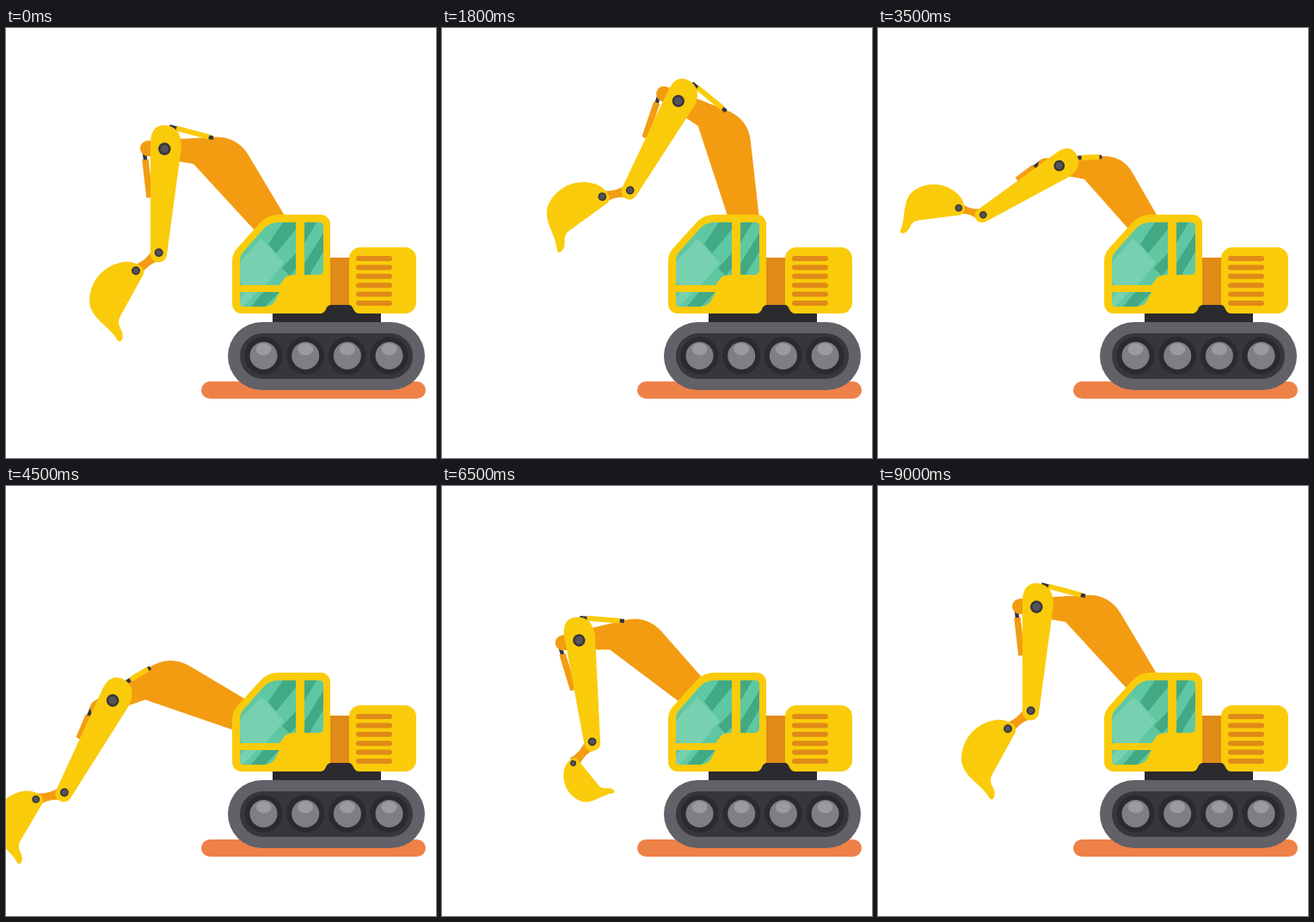
Animation, 500 px wide and 500 px high, one loop 10000 ms. Source, as an HTML page:

```html
<!DOCTYPE html>
<html lang="en">
<head>
<meta charset="utf-8">
<title>Excavator</title>
<style>
  html, body { margin: 0; height: 100%; overflow: hidden; background: #fff; }
  svg { display: block; width: 100%; height: 100%; }
  .yellow { fill: #facb0a; }
  .orange { fill: #f39c12; }
  .rust { fill: #e08a18; }
  .black { fill: #2b2a2f; }
  .glass { fill: #5fc8a2; }
  .shade { fill: #42a985; }
  .shine { fill: #77d0b0; }
  .rod { stroke: #37353b; stroke-width: 4.5; }
</style>
</head>
<body>
<svg viewBox="0 0 500 500">
  <defs>
    <g id="bolt">
      <circle r="7.3" fill="#37353b"/>
      <circle r="4.8" fill="#55535a"/>
    </g>
    <g id="wheel">
      <circle r="22" class="black"/>
      <circle r="16" fill="#7f7e84"/>
      <ellipse cy="-7.5" rx="9" ry="7" fill="#9b9aa0"/>
    </g>
    <clipPath id="panes">
      <path d="M272 299V271Q272 264 277 259L300 233Q307 226 316 226H337V287Q327 287 324 291L318 299Z"/>
      <path d="M272 307H318L313 317Q309 324 299 324H277Q272 324 272 319Z"/>
      <path d="M347 226H364Q369 226 369 231V281Q369 287 363 287H347Z"/>
    </clipPath>
  </defs>

  <rect x="227" y="411" width="261" height="20" rx="10" fill="#ee8148"/>

  <path id="rod1" class="rod"/>
  <path id="sleeve1" stroke="#f39c12" stroke-width="7.5"/>
  <g id="boom">
    <path class="orange" d="M165 131L240 127Q268 125 282 148L328 225L332 245L310 258L218 158L165 149A9 9 0 0 1 165 131Z"/>
  </g>
  <path id="rod2" class="rod"/>
  <path id="sleeve2" stroke="#facb0a" stroke-width="6"/>
  <g id="stick">
    <path class="orange" d="M148 276Q163 271 171 257L179 271Q166 273 157 287Z"/>
    <path class="yellow" d="M168 262V132Q169 113 184 113Q204 114 204 138L187 264A9.5 9.5 0 0 1 168 262Z"/>
    <use href="#bolt" x="184.3" y="140.6"/>
    <use href="#bolt" transform="translate(177.7 261.3) scale(.68)"/>
  </g>
  <g id="bucket">
    <path class="yellow" d="M157 277Q148 271 137 272C112 276 97 296 97 318C98 338 120 346 129 362Q132 367 135 362Q137 356 133 349Q129 342 133 335L160 286Q161 280 157 277Z"/>
    <use href="#bolt" transform="translate(151 282.3) scale(.68)"/>
  </g>

  <path class="black" d="M310 343V330H366L377 321H400L408 330H436V343Z"/>
  <rect x="376" y="267" width="25" height="55" class="rust"/>
  <path class="yellow" d="M399 322V268A13 13 0 0 1 412 255H464A13 13 0 0 1 477 268V319A13 13 0 0 1 464 332H411Q406 332 404 327Q402 322 399 322Z"/>
  <g id="vents" class="rust"></g>
  <path class="yellow" d="M263 321V271Q263 263 268 257L295 227Q304 217 316 217H366A11 11 0 0 1 377 228V322Q373 323 372 327Q370 332 365 332H274A11 11 0 0 1 263 321Z"/>
  <g clip-path="url(#panes)">
    <path class="glass" d="M263 217H377V332H263Z"/>
    <path class="shade" d="M322 226H337V234L314 262L305 251ZM337 262V280L330 288L321 279ZM347 226H361L347 250ZM369 238V260L353 287H347V274ZM299 307H318L301 324H285Z"/>
    <path class="shine" d="M297 245L323 273L302 299H276L272 295V272ZM278 307H292L276 324H272V313Z"/>
  </g>

  <rect x="258" y="342" width="229" height="79" rx="39.5" fill="#626168"/>
  <rect x="272" y="355" width="201" height="53" rx="26.5" fill="#37363d"/>
  <g id="wheels"></g>
</svg>
<script>
const $ = id => document.getElementById(id);

$('vents').innerHTML = [0, 1, 2, 3, 4, 5].map(i =>
  `<rect x="407" y="${265 + i * 10.4}" width="42" height="6" rx="3"/>`).join('');
$('wheels').innerHTML = [0, 1, 2, 3].map(i =>
  `<use href="#wheel" x="${299.5 + i * 48.7}" y="381"/>`).join('');

// One pose per second: turn of boom, of stick on boom, of bucket on stick
const poses = [
  [0, 0, 0], [0, 0, 0], [30.4, 1, 0], [30.4, 53, 0], [-28.4, 53, 0],
  [-28.4, 53, -46], [-21, 0, -1], [0, 0, -114], [0, 0, -114], [0, 0, 0], [0, 0, 0]
];
const names = ['boom', 'stick', 'bucket'];
const pivots = [[369, 314], [184.3, 140.6], [151, 282.3]];

const keys = poses.map(pose => {
  let m = new DOMMatrix();
  return pose.map((turn, i) => {
    const [x, y] = pivots[i];
    m = m.translate(x, y).rotate(turn).translate(-x, -y);
    return [m.a, m.b, m.c, m.d, m.e, m.f];
  });
});

const mix = (p, q, k) => p.map((v, i) => v + (q[i] - v) * k);
const apply = ([a, b, c, d, e, f], x, y) => [a * x + c * y + e, b * x + d * y + f];
const line = (id, p, q) => $(id).setAttribute('d', `M${p}L${q}`);

// Hydraulic ram from p to q, its sleeve covering the part from k0 to k1
function ram(i, p, q, k0, k1) {
  line('rod' + i, p, q);
  line('sleeve' + i, mix(p, q, k0), mix(p, q, k1));
}

function draw(now) {
  const t = Math.floor(now % 10000 / 100) / 10;
  const n = Math.floor(t);
  // Matrices blend linearly, so parts shrink a little while they turn
  const [boom, stick] = names.map((name, i) => {
    const m = mix(keys[n][i], keys[n + 1][i], t - n);
    $(name).setAttribute('transform', `matrix(${m})`);
    return m;
  });
  ram(1, apply(stick, 167, 197), apply(boom, 160, 136), 0, .72);
  ram(2, apply(stick, 190, 114.5), apply(boom, 241, 128), .16, .9);
  requestAnimationFrame(draw);
}
requestAnimationFrame(draw);
</script>
</body>
</html>
```
